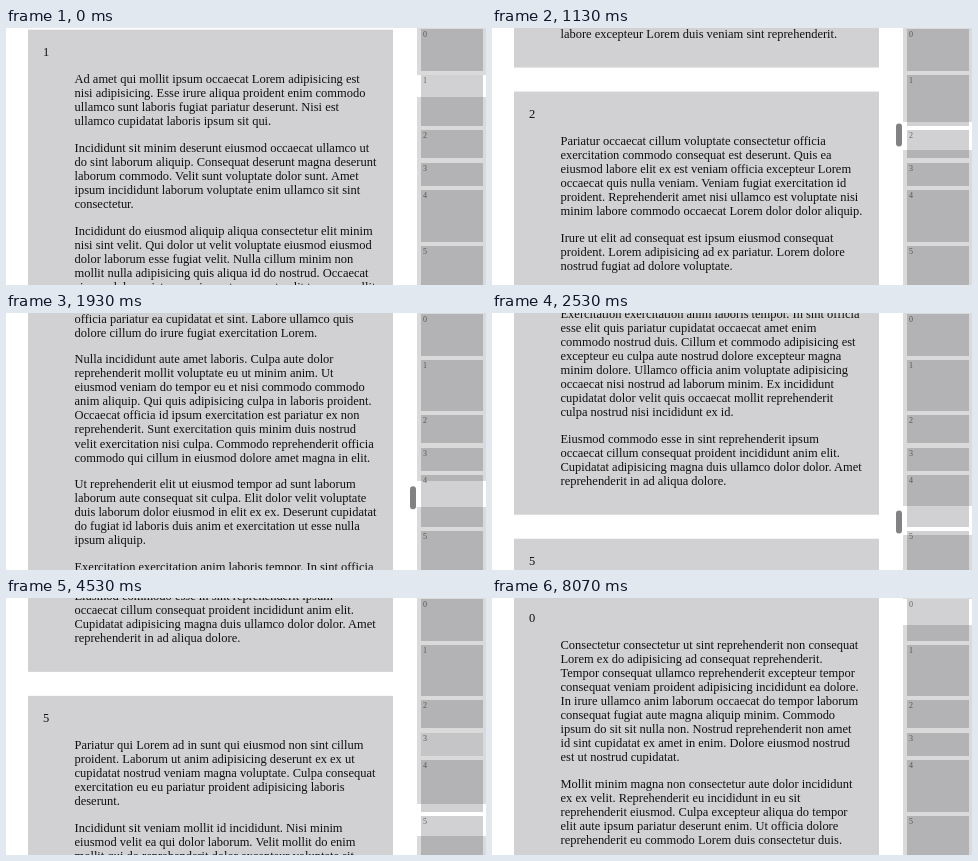
Animation of 480 by 257 pixels, one loop 9.94 s. Source, as an HTML page:

```html
<!DOCTYPE html>
<html lang="la">
<head>
<meta charset="utf-8">
<title>Document with minimap</title>
<style>
html, body { margin: 0; width: 100%; height: 100%; overflow: hidden; background: #fff; }
#stage { position: relative; width: 480px; height: 257px; overflow: hidden;
  font: 12.48px/14.04px "Liberation Serif", Times, serif; color: #111; }
#doc { position: absolute; left: 22px; top: 0; width: 365px; }
.section { position: absolute; width: 365px; background: #d1d0d2; }
.section b { position: absolute; left: 15px; top: 15px; font-weight: normal; }
.section p { margin: 0 0 12.48px 46.5px; white-space: pre; }
#thumb { position: absolute; left: 404px; top: 0; width: 6px; height: 23px; border-radius: 3px; background: #828183; }
#map { position: absolute; left: 411px; top: 0; width: 69px; height: 257px; overflow: hidden; background: #fff; }
.block { position: absolute; left: 4px; width: 62px; background: #d1d0d2; color: #666;
  font-size: 8px; line-height: 11px; text-indent: 2px; }
.block.hover { background: #e6e5e7; }
#view { position: absolute; left: 0; width: 69px; box-shadow: 0 0 0 400px rgba(0, 0, 0, .145); }
</style>
</head>
<body>
<div id="stage">
  <div id="doc"></div>
  <div id="thumb"></div>
  <div id="map"><div id="view"></div></div>
</div>
<script>
// Paragraphs are split by blank lines; "~n" stands for n generated lines.
const texts = [
`Consectetur consectetur ut sint reprehenderit non consequat
Lorem ex do adipisicing ad consequat reprehenderit.
Tempor consequat ullamco reprehenderit excepteur tempor
consequat veniam proident adipisicing incididunt ea dolore.
In irure ullamco anim laborum occaecat do tempor laborum
consequat fugiat aute magna aliquip minim. Commodo
ipsum do sit sit nulla non. Nostrud reprehenderit non amet
id sint cupidatat ex amet in enim. Dolore eiusmod nostrud
est ut nostrud cupidatat.

Mollit minim magna non consectetur aute dolor incididunt
ex ex velit. Reprehenderit eu incididunt in eu sit
reprehenderit eiusmod. Culpa excepteur aliqua do tempor
elit aute ipsum pariatur deserunt enim. Ut officia dolore
reprehenderit eu commodo Lorem duis consectetur duis.

~9`,
`Ad amet qui mollit ipsum occaecat Lorem adipisicing est
nisi adipisicing. Esse irure aliqua proident enim commodo
ullamco sunt laboris fugiat pariatur deserunt. Nisi est
ullamco cupidatat laboris ipsum sit qui.

Incididunt sit minim deserunt eiusmod occaecat ullamco ut
do sint laborum aliquip. Consequat deserunt magna deserunt
laborum commodo. Velit sunt voluptate dolor sunt. Amet
ipsum incididunt laborum voluptate enim ullamco sit sint
consectetur.

Incididunt do eiusmod aliquip aliqua consectetur elit minim
nisi sint velit. Qui dolor ut velit voluptate eiusmod eiusmod
dolor laborum esse fugiat velit. Nulla cillum minim non
mollit nulla adipisicing quis aliqua id do nostrud. Occaecat
eiusmod do pariatur non in sunt occaecat velit tempor mollit
~3

~8

~7
labore excepteur Lorem duis veniam sint reprehenderit.`,
`Pariatur occaecat cillum voluptate consectetur officia
exercitation commodo consequat est deserunt. Quis ea
eiusmod labore elit ex est veniam officia excepteur Lorem
occaecat quis nulla veniam. Veniam fugiat exercitation id
proident. Reprehenderit amet nisi ullamco est voluptate nisi
minim labore commodo occaecat Lorem dolor dolor aliquip.

Irure ut elit ad consequat est ipsum eiusmod consequat
proident. Lorem adipisicing ad ex pariatur. Lorem dolore
nostrud fugiat ad dolore voluptate.

Eu proident dolor aliquip aliqua aute elit ad nostrud labore
in pariatur adipisicing amet. Ea officia tempor laborum
tempor ipsum voluptate laboris quis eu velit nulla cupidatat
nostrud ullamco. Ex commodo amet enim officia aliquip.`,
`~5

~4

~4

~6`,
`~1
officia pariatur ea cupidatat et sint. Labore ullamco quis
dolore cillum do irure fugiat exercitation Lorem.

Nulla incididunt aute amet laboris. Culpa aute dolor
reprehenderit mollit voluptate eu ut minim anim. Ut
eiusmod veniam do tempor eu et nisi commodo commodo
anim aliquip. Qui quis adipisicing culpa in laboris proident.
Occaecat officia id ipsum exercitation est pariatur ex non
reprehenderit. Sunt exercitation quis minim duis nostrud
velit exercitation nisi culpa. Commodo reprehenderit officia
commodo qui cillum in eiusmod dolore amet magna in elit.

Ut reprehenderit elit ut eiusmod tempor ad sunt laborum
laborum aute consequat sit culpa. Elit dolor velit voluptate
duis laborum dolor eiusmod in elit ex ex. Deserunt cupidatat
do fugiat id laboris duis anim et exercitation ut esse nulla
ipsum aliquip.

Exercitation exercitation anim laboris tempor. In sint officia
esse elit quis pariatur cupidatat occaecat amet enim
commodo nostrud duis. Cillum et commodo adipisicing est
excepteur eu culpa aute nostrud dolore excepteur magna
minim dolore. Ullamco officia anim voluptate adipisicing
occaecat nisi nostrud ad laborum minim. Ex incididunt
cupidatat dolor velit quis occaecat mollit reprehenderit
culpa nostrud nisi incididunt ex id.

Eiusmod commodo esse in sint reprehenderit ipsum
occaecat cillum consequat proident incididunt anim elit.
Cupidatat adipisicing magna duis ullamco dolor dolor. Amet
reprehenderit in ad aliqua dolore.`,
`Pariatur qui Lorem ad in sunt qui eiusmod non sint cillum
proident. Laborum ut anim adipisicing deserunt ex ex ut
cupidatat nostrud veniam magna voluptate. Culpa consequat
exercitation eu eu pariatur proident adipisicing laboris
deserunt.

Incididunt sit veniam mollit id incididunt. Nisi minim
eiusmod velit ea qui dolor laborum. Velit mollit do enim
mollit qui do reprehenderit dolor excepteur voluptate sit
~4

~9`
];

const LOOP = 9940, TICK = 1000 / 15, VIEW = 257, LINE = 14.04, GAP = 24;
const mapTops = [1, 47, 102, 135, 162, 218];
const mapHeights = [42, 50.5, 28, 22.5, 51.5, 50];
const $ = id => document.getElementById(id);
const words = texts[2].toLowerCase().match(/[a-z]+/g);

let seed = 7;
const random = () => (seed = seed * 16807 % 2147483647) / 2147483647;
const capital = w => w[0].toUpperCase() + w.slice(1);

function filler(count) {
  const lines = [];
  let line = "", left = 0;
  while (lines.length < count) {
    let word = words[Math.floor(random() * words.length)];
    if (!left) { word = capital(word); left = 5 + Math.floor(random() * 6); }
    if (!--left) word += ".";
    if (line.length + word.length > 56) { lines.push(line); line = word; }
    else line += (line ? " " : "") + word;
  }
  lines[count - 1] = lines[count - 1].slice(0, 46).replace(/\W*\s\S*$/, ".");
  return lines.join("\n");
}

function add(parent, tag, className, text) {
  const el = document.createElement(tag);
  el.className = className;
  el.textContent = text;
  return parent.appendChild(el);
}

const tops = [], heights = [], blocks = [];
texts.forEach((text, i) => {
  const paras = text.replace(/~(\d+)/g, (_, n) => filler(+n)).split("\n\n");
  const count = paras.join("\n").split("\n").length;
  tops[i] = i ? tops[i - 1] + heights[i - 1] + GAP : 0;
  heights[i] = 83.5 + LINE * (count - 1) + 12.48 * (paras.length - 1);
  const section = add($("doc"), "div", "section", "");
  section.style.cssText = `top:${tops[i]}px;height:${heights[i] - 42}px;padding-top:42px`;
  add(section, "b", "", i);
  paras.forEach(p => add(section, "p", "", p));
  const block = add($("map"), "div", "block", i);
  block.style.cssText = `top:${mapTops[i]}px;height:${mapHeights[i]}px`;
  blocks.push(block);
});
$("map").append($("view"));

// time, scroll offset, speed in px/ms
const wheel = [
  [533, tops[1] - 2, .3],
  [1133, tops[2] - 64, 1.15],
  [1933, tops[4] + 57, .7],
  [2533, tops[5] - 226, .4],
  [2933, tops[5] - 98, .12]
];
const jumps = [[5130, 3], [5730, 2], [6470, 1], [7000, 0]];
const hovers = [[0, -1], [4530, 3], [4670, 2], [4800, 3], [5400, 2], [6070, 1], [6670, 0], [7800, -1]];

const latest = (table, t) => table.filter(row => row[0] <= t + 5).pop();

function scrollAt(t) {
  const jump = latest(jumps, t);
  if (jump) return tops[jump[1]] + 2;
  if (t <= wheel[0][0]) return wheel[0][1];
  const i = wheel.findIndex(row => row[0] > t);
  if (i < 0) return wheel[wheel.length - 1][1];
  const [t0, a, va] = wheel[i - 1], [t1, b, vb] = wheel[i];
  const d = t1 - t0, u = (t - t0) / d, w = 1 - u;
  return w * w * (1 + 2 * u) * a + u * u * (3 - 2 * u) * b + d * u * w * (w * va - u * vb);
}

function toMap(y) {
  let i = tops.length - 1;
  while (i && tops[i] > y) i--;
  const inside = Math.min(y - tops[i], heights[i]);
  const past = y - tops[i] - inside;
  return mapTops[i] + inside / heights[i] * mapHeights[i] + past * .19;
}

function thumbAlpha(t) {
  const fade = start => Math.max(0, 1 - (Math.floor((t - start + 5) / TICK) + 1) / 3);
  if (t < 595) return 0;
  if (t < 3465) return 1;
  if (t < 5125) return fade(3470);
  return t < 7795 ? 1 : fade(7800);
}

function draw(now) {
  const t = Math.floor((now % LOOP + 4) / TICK) * TICK;
  const s = scrollAt(t), top = toMap(s), hover = latest(hovers, t)[1];
  $("doc").style.transform = `translateY(${-s}px)`;
  $("thumb").style.transform = `translateY(${2 + s * .095}px)`;
  $("thumb").style.opacity = thumbAlpha(t);
  $("view").style.top = top + "px";
  $("view").style.height = toMap(s + VIEW) - top + "px";
  blocks.forEach((b, i) => b.classList.toggle("hover", i === hover));
}

const start = performance.now();
function frame() {
  draw(performance.now() - start);
  requestAnimationFrame(frame);
}
frame();
</script>
</body>
</html>
```
